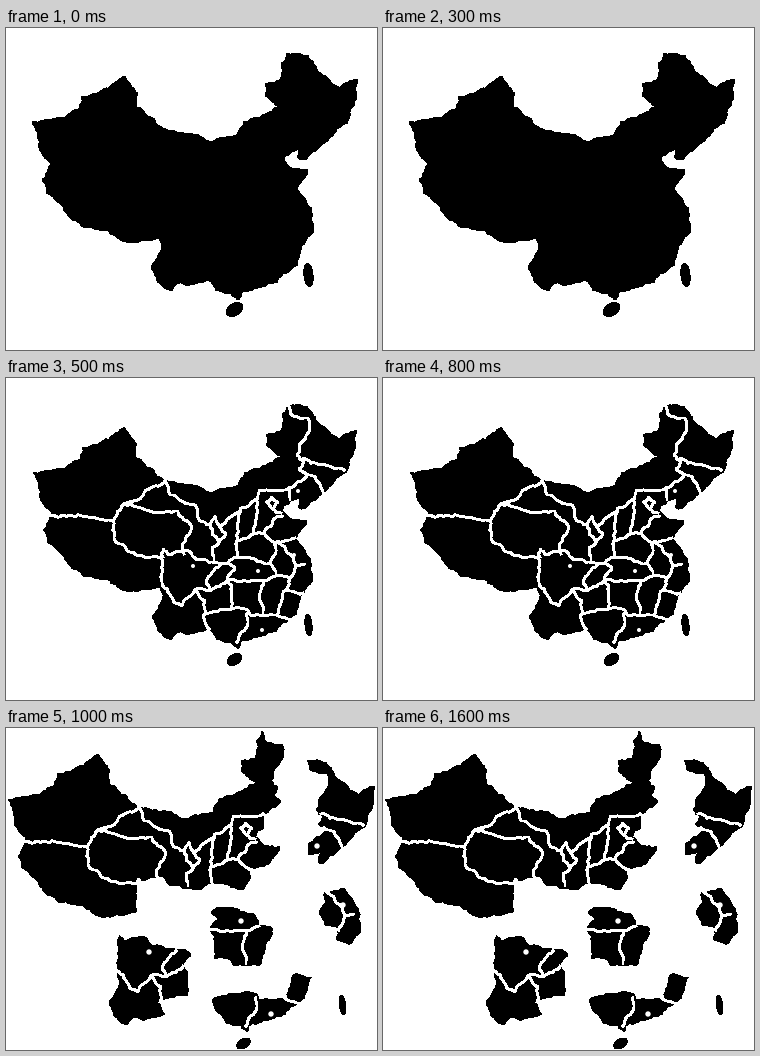
A matplotlib script that plays this animation: 371x322 px, repeating every 2000 ms.

```python
import math
import random

import matplotlib.pyplot as plt
from matplotlib.animation import FuncAnimation
from matplotlib.patches import Circle, Polygon

WIDTH, HEIGHT, DPI = 371, 322, 100
PX = 72 / DPI
rng = random.Random(11)


def rough(*keys, bump=1.5):
    """Join key points by jagged lines, split until every step is short."""
    def split(a, b):
        length = math.dist(a, b)
        if length < 4:
            return [b]
        k = rng.uniform(-1, 1) * min(bump / length, 0.2)
        mid = ((a[0] + b[0]) / 2 - k * (b[1] - a[1]),
               (a[1] + b[1]) / 2 + k * (b[0] - a[0]))
        return split(a, mid) + split(mid, b)

    line = [keys[0]]
    for a, b in zip(keys, keys[1:]):
        line += split(a, b)
    return line


def ring(*arcs):
    return [point for arc in arcs for point in arc]


def back(arc):
    return arc[::-1]


# Corners of the regions
west_tip, north_tip, bohai = (28, 95), (282, 27), (284, 122)
tibet_end, shaanxi_end, henan_end = (156, 208), (222, 185), (264, 185)
shandong_end, hunan_end, yunnan_end = (289, 160), (226, 231), (203, 251)
jiangxi_end, zhejiang_end = (281, 211), (297, 215)

# Outer edges
north_edge = rough(
    west_tip, (57, 91), (75, 81), (77, 70), (104, 62), (118, 50), (130, 66),
    (129, 80), (157, 102), (205, 115), (233, 108), (239, 95), (263, 86),
    (278, 78), (261, 67), (261, 57), (275, 54), (277, 36), north_tip)
west_edge = rough(
    west_tip, (33, 107), (38, 126), (46, 137), (38, 152), (42, 164), (62, 184),
    (76, 196), (102, 201), (118, 212), tibet_end)
northeast_edge = rough(
    north_tip, (301, 29), (313, 46), (333, 62), (350, 53), (347, 76), (340, 94),
    (317, 114), (299, 130), (293, 129), (297, 120), bohai)
bohai_edge = rough(bohai, (273, 133), (284, 141), (300, 143), shandong_end)
east_edge = rough(shandong_end, (304, 181), (306, 203), zhejiang_end)
south_edge = rough(
    zhejiang_end, (290, 236), (270, 253), (234, 264), (232, 270), (226, 264),
    (211, 261), yunnan_end)
southwest_edge = rough(
    tibet_end, (157, 221), (147, 240), (155, 254), (165, 261), (171, 254),
    (185, 255), yunnan_end)

# Borders between regions
khingan = rough(
    north_tip, (287, 38), (302, 40), (304, 51), (291, 77), (298, 84), (293, 91),
    (301, 98), (283, 111), bohai)
sichuan_top = rough(
    tibet_end, (157, 171), (163, 177), (183, 173), (191, 182), shaanxi_end)
hubei_top = rough(shaanxi_end, (231, 179), henan_end)
huai = rough(henan_end, (270, 175), (270, 164), shandong_end)
wuling = rough(shaanxi_end, (229, 192), (221, 201), (226, 208), hunan_end)
guangxi_west = rough(hunan_end, (197, 238), yunnan_end)
nanling = rough(hunan_end, (239, 231), (244, 237), (271, 237), (276, 218),
                jiangxi_end)
anhui_west = rough(henan_end, (270, 197), (284, 201), jiangxi_end)
fujian_top = rough(jiangxi_end, (291, 215), zhejiang_end)
region_lines = [khingan, sichuan_top, hubei_top, huai, wuling, guangxi_west,
                nanling, anhui_west, fujian_top]

# Junctions of the inner borders
kunlun, qilian, gobi, loess = (107, 143), (118, 126), (159, 103), (213, 164)
ordos, hetao, datong = (214, 149), (235, 130), (251, 121)
tongguan, handan, puyang = (231, 162), (248, 156), (258, 155)
sichuan_south, jingzhou, taihu = (189, 212), (258, 203), (290, 188)

north_lines = [
    rough((44, 138), (76, 138), kunlun),
    rough(kunlun, (108, 161), (130, 177), (157, 179)),
    rough(kunlun, (111, 134), qilian),
    rough(qilian, (134, 121), (140, 112), gobi),
    rough(qilian, (146, 134), (172, 133), (186, 149), (176, 167), (178, 176)),
    rough(gobi, (164, 117), (190, 128), (193, 142), (204, 147), (209, 138), ordos),
    rough((204, 147), (206, 156), loess, (220, 155), ordos),
    rough(loess, (206, 170), (208, 182)),
    rough(ordos, hetao, datong),
    rough(hetao, tongguan, (232, 179)),
    rough(tongguan, handan, puyang),
    rough(datong, handan),
    rough(datong, (253, 112), (283, 110)),
    rough((261, 124), (266, 119), (272, 124), (267, 131), (261, 124)),
    rough((267, 131), (275, 135)),
    rough((269, 165), puyang, (268, 141), (277, 138)),
]
northeast_lines = [
    rough((296, 81), (315, 87), (338, 92)),
    rough((299, 95), (310, 99), (317, 114)),
]
southwest_lines = [
    rough((157, 208), (168, 224), (176, 228), sichuan_south, (205, 212), (221, 202)),
    rough((214, 187), (200, 203), (205, 212)),
    rough(sichuan_south, (199, 223), (198, 238)),
]
central_lines = [
    rough((221, 201), (243, 204), jingzhou, (270, 198)),
    rough(jingzhou, (254, 215), (257, 236)),
]
east_lines = [
    rough((272, 164), (286, 178), taihu, (299, 186)),
    rough(taihu, (284, 203)),
]
south_lines = [
    rough((241, 235), (242, 245), (231, 264)),
    rough((271, 237), (285, 242)),
]


def island(cx, cy, rx, ry, lean):
    turns = [math.tau * i / 24 for i in range(24)]
    return [(cx + rx * math.cos(t) - lean * math.sin(t), cy + ry * math.sin(t))
            for t in turns]


hainan = island(228.5, 281.5, 6, 5.5, 3)
taiwan = island(302.5, 247, 3, 10, -1)

# Outlines, inner borders, cities, shift when the map is pulled apart
regions = [
    ([ring(back(west_edge), north_edge, khingan, bohai_edge, back(huai),
           back(hubei_top), back(sichuan_top))], north_lines, [], (-26, -24)),
    ([ring(northeast_edge, back(khingan))], northeast_lines, [(292, 113)], (19, 5)),
    ([ring(sichuan_top, wuling, guangxi_west, back(southwest_edge))],
     southwest_lines, [(187, 188)], (-44, 36)),
    ([ring(hubei_top, anhui_west, back(nanling), back(wuling))],
     central_lines, [(252, 193)], (-17, 0)),
    ([ring(huai, east_edge, back(fujian_top), back(anhui_west))],
     east_lines, [(288, 177)], (49, 0)),
    ([ring(nanling, fujian_top, south_edge, back(guangxi_west)), hainan],
     south_lines, [(256, 252)], (9, 34)),
    ([taiwan], [], [], (34, 30)),
]

fig = plt.figure(figsize=(WIDTH / DPI, HEIGHT / DPI), dpi=DPI, facecolor="white")
ax = fig.add_axes((0, 0, 1, 1))


def move(points, shift):
    return [(x + shift[0], y + shift[1]) for x, y in points]


def draw_land(edge, spread=0):
    for outlines, _, _, (dx, dy) in regions:
        for outline in outlines:
            ax.add_patch(Polygon(
                move(outline, (dx * spread, dy * spread)), facecolor="black",
                edgecolor="black" if edge else "none", lw=edge * PX,
                joinstyle="round", antialiased=False))


def draw_border(points):
    ax.plot(*zip(*points), color="white", lw=1.8 * PX, antialiased=False,
            solid_joinstyle="round")


def draw_details(spread, radius):
    for _, lines, cities, (dx, dy) in regions:
        shift = dx * spread, dy * spread
        for line in lines:
            draw_border(move(line, shift))
        for city in move(cities, shift):
            ax.add_patch(Circle(city, radius, facecolor="white", edgecolor="none"))


def update(frame):
    ax.clear()
    ax.set(xlim=(0, WIDTH), ylim=(HEIGHT, 0))
    ax.axis("off")
    if frame == 0:
        draw_land(edge=3)
    elif frame == 1:
        draw_land(edge=1)
        for line in region_lines:
            draw_border(line)
        draw_details(spread=0, radius=2)
    else:
        draw_land(edge=0, spread=1)
        draw_details(spread=1, radius=2.7)
    return []


anim = FuncAnimation(fig, update, frames=4, interval=500, repeat=True,
                     repeat_delay=0, init_func=lambda: [])
plt.show()
```
